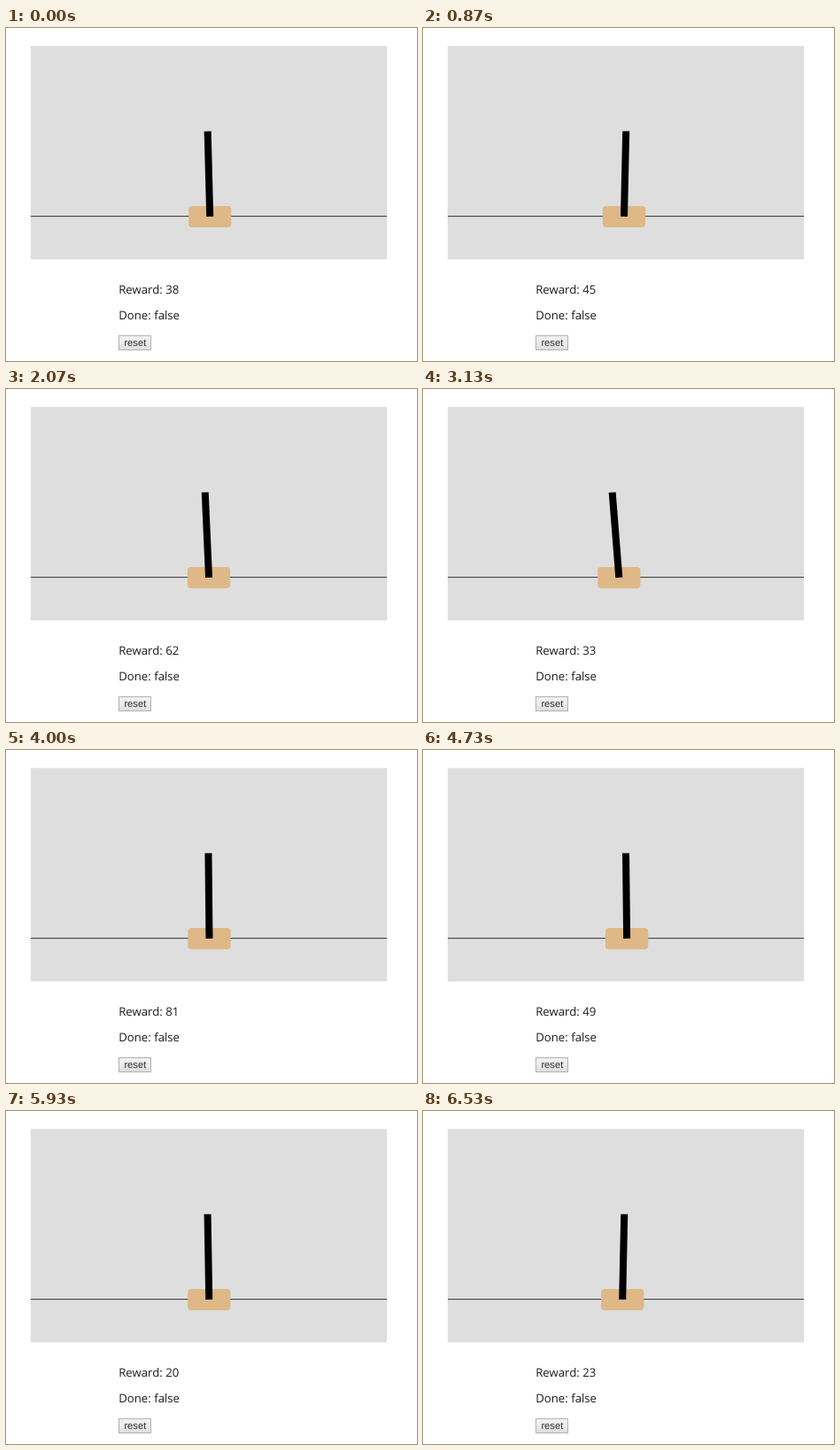
These frames come from a looping animation (464x376 px, 6590 ms). An HTML page:

```html
<!DOCTYPE html>
<html lang="en">
<head>
<meta charset="utf-8">
<title>Cart pole</title>
<style>
  html, body { margin: 0; width: 100%; height: 100%; overflow: hidden; background: #fff; }
  svg { display: block; text-rendering: geometricPrecision; }
  .label { font: 13.2px "Open Sans", "Noto Sans", sans-serif; fill: #1c1c1c; }
  .button { font: 11.2px "Liberation Sans", Arial, sans-serif; fill: #2c2c2c; }
</style>
</head>
<body>
<svg width="464" height="376" viewBox="0 0 464 376">
  <defs>
    <linearGradient id="face" x2="0" y2="1">
      <stop offset="0" stop-color="#f3f3f3"/>
      <stop offset=".5" stop-color="#ebebeb"/>
      <stop offset="1" stop-color="#dcdcdc"/>
    </linearGradient>
  </defs>
  <rect x="27.8" y="20.3" width="402.2" height="241" fill="#dedede"/>
  <path d="M28 212.6H430" stroke="#222" stroke-width=".9"/>
  <g id="cart">
    <rect x="-24.1" y="-12" width="48.2" height="24" rx="4" fill="#deb887"/>
    <rect id="pole" x="-4" y="-96.4" width="8" height="96.4"/>
  </g>
  <text class="label" x="127.2" y="300">Reward: <tspan id="reward"></tspan></text>
  <text class="label" x="127.2" y="329.3">Done: false</text>
  <rect x="127.5" y="347.5" width="36" height="16" fill="url(#face)" stroke="#b2b2b2"/>
  <text class="button" x="133.4" y="359">reset</text>
</svg>
<script>
const LOOP = 6590, HOME = 230.5, REWARD_RATE = 8;

// The cart starts each episode upright at home; drift and lean are per step.
const episodes = [
  { start: -4.75,  drift: -0.06, lean: -0.32 },
  { start: 7.375,  drift: -0.62, lean: 0.23 },
  { start: 23.25,  drift: -0.19, lean: -0.33 },
  { start: 42.875, drift: -2.23, lean: -1.1 },
  { start: 49.875, drift: -0.1,  lean: -0.06 },
  { start: 64.875, drift: -0.06, lean: -0.11 },
  { start: 86.5,   drift: -0.5,  lean: -0.4 },
  { start: 95.125, drift: -1.84, lean: 0.42 }
];

const el = id => document.getElementById(id);
const cart = el("cart"), pole = el("pole"), reward = el("reward");

// 15 steps per second, starting on whole hundredths of a second.
const stepAt = ms => Math.floor((Math.floor(ms / 10) + 0.5) * 0.15);

function draw(ms) {
  const step = stepAt(ms);
  const { start, drift, lean } = episodes.filter(e => e.start <= step).pop();
  const age = step - start;
  cart.setAttribute("transform", `translate(${HOME + drift * age} 212.9)`);
  pole.setAttribute("transform", `rotate(${lean * age})`);
  reward.textContent = Math.round(age * REWARD_RATE);
}

const begin = performance.now();
function tick() {
  draw((performance.now() - begin) % LOOP);
  requestAnimationFrame(tick);
}
tick();
</script>
</body>
</html>
```
